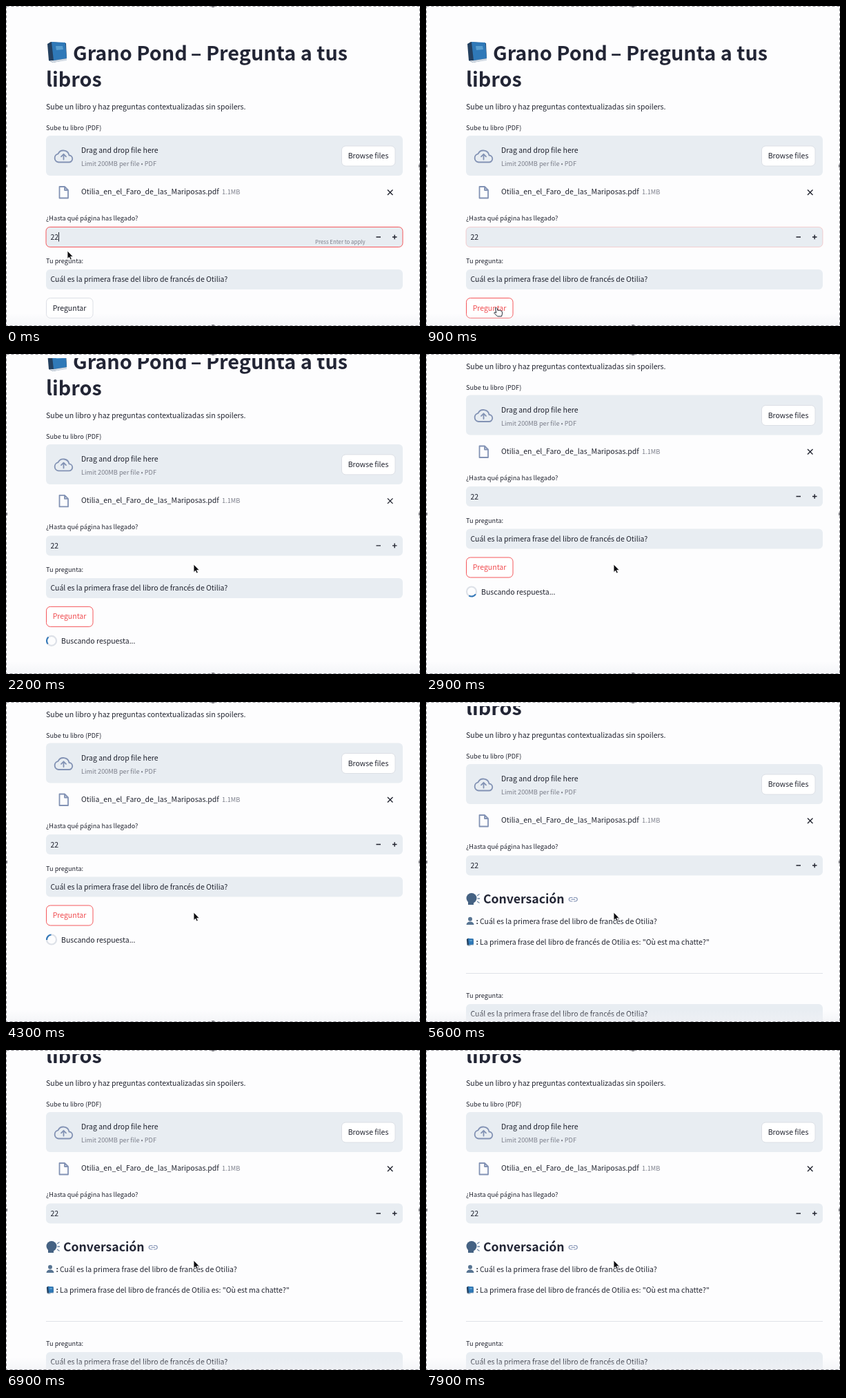
These frames come from a looping animation (600 px wide and 464 px high, 8 s). An HTML page:

```html
<!DOCTYPE html>
<html lang="es">
<head>
<meta charset="utf-8">
<title>Grano Pond</title>
<style>
html, body { margin: 0; width: 100%; height: 100%; overflow: hidden; background: #fdfdfe; }
svg { display: block; }
text {
  font: 10.5px "Noto Sans CJK JP", "Noto Sans CJK SC", "Noto Sans CJK", "Noto Sans", sans-serif;
  fill: #20232f; white-space: pre;
}
.title { font-size: 28.8px; font-weight: 700; fill: #222535; }
.head { font-size: 17.6px; font-weight: 700; fill: #222535; }
.label { font-size: 9.2px; }
.gray { fill: #7b7e8a; }
.hint { font-size: 7.85px; }
.bold { font-weight: 700; }
.field { fill: #e8edf2; }
.btn { fill: #fff; stroke: #dcdfe5; }
.line { fill: none; stroke: #8292b4; stroke-width: 1.8; stroke-linejoin: round; stroke-linecap: round; }
.dark { stroke: #20232f; stroke-width: 1.4; fill: none; }
</style>
</head>
<body>
<svg width="600" height="464" viewBox="0 0 600 464">
  <defs>
    <g id="book">
      <path d="M1 4L6 1L28 3L29 27L9 31L3 28Z" fill="#24405f"/>
      <path d="M7 1L27 2L29 25L10 28Z" fill="#2f79b8"/>
      <path d="M4 28L10 28L29 25V28L9 31Z" fill="#d3dbe4"/>
      <path d="M13 7L23 7L24 12L14 13Z" fill="#5a9fd0"/>
    </g>
    <linearGradient id="fade" x2="0" y2="1">
      <stop stop-color="#f0f1f5" stop-opacity="0"/>
      <stop offset="1" stop-color="#f0f1f5" stop-opacity=".7"/>
    </linearGradient>
  </defs>
  <svg y="6" width="600" height="457">
    <g id="page">
      <use href="#book" x="59" y="51"/>
      <text class="title" x="97" y="79">Grano Pond</text>
      <text class="title" x="495" y="79" text-anchor="end">– Pregunta a tus</text>
      <text class="title" x="58" y="117">libros</text>
      <text x="58" y="150">Sube un libro y haz preguntas contextualizadas sin spoilers.</text>

      <text class="label" x="58" y="180">Sube tu libro (PDF)</text>
      <rect class="field" x="58" y="188" width="517" height="58" rx="5.8"/>
      <path class="line" d="M76 226.500H91A5 5 0 0 0 91.500 216.500A8.500 8.500 0 0 0 75.500 214.300A6.200 6.200 0 0 0 76 226.500ZM83.500 222.500V215M80 218.300L83.500 214.800L87 218.300"/>
      <text x="109" y="213">Drag and drop file here</text>
      <text class="label gray" x="109" y="232">Limit 200MB per file • PDF</text>
      <rect class="btn" x="486.500" y="203" width="77.500" height="29" rx="5.800"/>
      <text x="525" y="221" text-anchor="middle">Browse files</text>
      <path class="line" d="M77.500 262H85L90 267V278.500H77.500ZM85 262V267H90"/>
      <text x="109" y="273">Otilia_en_el_Faro_de_las_Mariposas.pdf</text>
      <text class="label gray" x="313" y="273">1.1MB</text>
      <path class="dark" d="M553 266.500L560.500 274M560.500 266.500L553 274"/>

      <text class="label" x="58" y="311">¿Hasta qué página has llegado?</text>
      <rect class="field" x="58" y="320.500" width="517" height="29" rx="5.800"/>
      <rect id="focus" x="58" y="320.500" width="517" height="29" rx="5.800" fill="none" stroke="#f4575b"/>
      <text x="64.500" y="339">22</text>
      <path id="caret" class="dark" style="stroke-width:1" d="M76.500 328V341.500"/>
      <text id="hint" class="hint gray" x="448" y="345">Press Enter to apply</text>
      <path class="dark" d="M536.500 335H543M560 335H566.500M563.200 331.700V338.300"/>

      <g id="answer">
        <circle cx="66" cy="382.500" r="7.500" fill="#456283"/>
        <path d="M61 387H69V392H61Z" fill="#456283"/>
        <path d="M74 379L77.500 376.500M74.500 383H78M74 387L77.500 389.500" stroke="#6f88a5" stroke-width="1.300"/>
        <text class="head" x="83" y="389.500">Conversación</text>
        <path class="line" style="stroke-width:1.200" d="M212 381.500H210A2.700 2.700 0 0 0 210 387H212M214.500 381.500H216.500A2.700 2.700 0 0 1 216.500 387H214.500M211 384.200H215.500"/>
        <circle cx="64" cy="412.700" r="3" fill="#577492"/>
        <path d="M58.500 421Q59 416.500 64 416.500T69.500 421Z" fill="#577492"/>
        <text class="bold" x="72.500" y="419.500">:</text>
        <text x="78" y="419.500">Cuál es la primera frase del libro de francés de Otilia?</text>
        <use href="#book" transform="translate(58.500 440.500) scale(.36)"/>
        <text class="bold" x="72.500" y="450">:</text>
        <text x="78" y="450">La primera frase del libro de francés de Otilia es: "Où est ma chatte?"</text>
        <path d="M58 491.500H575" stroke="#dfe2e8"/>
      </g>

      <g id="form">
        <text class="label" x="58" y="373">Tu pregunta:</text>
        <rect class="field" x="58" y="382" width="517" height="29" rx="5.800"/>
        <text x="64.500" y="400">Cuál es la primera frase del libro de francés de Otilia?</text>
        <rect id="ask" class="btn" x="58.500" y="423.500" width="67.500" height="29" rx="5.800"/>
        <text id="askText" x="92" y="441.500" text-anchor="middle">Preguntar</text>
      </g>

      <g id="wait">
        <g fill="none" stroke-width="2.200">
          <circle cx="66" cy="473" r="7" stroke="#dde1e8"/>
          <path id="arc" d="M61.050 468.050A7 7 0 0 1 70.950 468.050" stroke="#3378b8"/>
        </g>
        <text x="80" y="477">Buscando respuesta...</text>
      </g>
    </g>
  </svg>
  <rect y="446" width="600" height="18" fill="url(#fade)"/>

  <rect x=".5" y=".5" width="599" height="463" fill="none" stroke="#8e8e94" stroke-dasharray="4 3"/>
  <path d="M298 0H302V2H298ZM298 462H302V464H298ZM0 230H2V234H0ZM598 230H600V234H598Z" fill="#808086"/>

  <g id="cursor" stroke-linejoin="round">
    <path id="arrow" d="M0 0V11.500L2.600 9.200L4.300 13L6.300 12.100L4.600 8.400H8.200Z" fill="#0c0c10" stroke="#fff" stroke-width=".8"/>
    <path id="hand" d="M-1.500 0Q0-1.500 1 .5L2 3.500Q3.500 2.500 4.200 3.500Q5.700 2.700 6.300 4Q8 3.300 8.300 5.500L8.500 8.500L7.500 12H1.500L-3 7.500Q-3.500 5.500-1.500 6.300L-.3 7Z" fill="#fff" stroke="#20232f"/>
  </g>
</svg>
<script>
const LOOP = 8000, CLICK = 800, ANSWER = 5600;
const el = id => document.getElementById(id);
const ramp = (t, a, b) => Math.min(1, Math.max(0, (t - a) / (b - a)));
const ease = u => u * u * (3 - 2 * u);
const coast = u => 1 - (1 - u) ** 1.45;
const show = (id, on) => el(id).setAttribute('visibility', on ? 'visible' : 'hidden');
const move = (id, x, y) => el(id).setAttribute('transform', `translate(${x} ${y})`);

function draw(t) {
  // The page gets shorter, so it scrolls back, when the spinner leaves
  const answered = t >= ANSWER;
  const scroll = answered ? 98 : 128.5 * coast(ramp(t, 2000, 2600));
  move('page', 0, -6 - scroll);
  move('form', 0, answered ? 154 : 0);
  show('answer', answered);
  show('wait', t >= 1000 && !answered);
  el('arc').setAttribute('transform', `rotate(${t * .36 + 203} 66 473)`);

  // Number field loses focus on the click
  show('caret', t < CLICK && t % 1000 < 500);
  show('hint', t < CLICK);
  el('focus').setAttribute('opacity', 1 - ramp(t, CLICK - 50, CLICK + 150));

  const down = ease(ramp(t, 0, 600)), away = ease(ramp(t, 1100, 1700));
  const x = 89 + 13 * down + 170 * away, y = 355 + 83 * down - 133 * away;
  const over = x < 126 && y > 423 && y < 453;
  move('cursor', x, y);
  show('arrow', !over);
  show('hand', over);

  const hot = !answered && (over || t >= CLICK);
  el('ask').style.stroke = hot ? '#f4575b' : '';
  el('askText').style.fill = hot ? '#f04c50' : '';
}

function tick() {
  const t = performance.now() % LOOP;
  draw(Math.floor(t / 100) * 100);
  requestAnimationFrame(tick);
}
tick();
</script>
</body>
</html>
```
